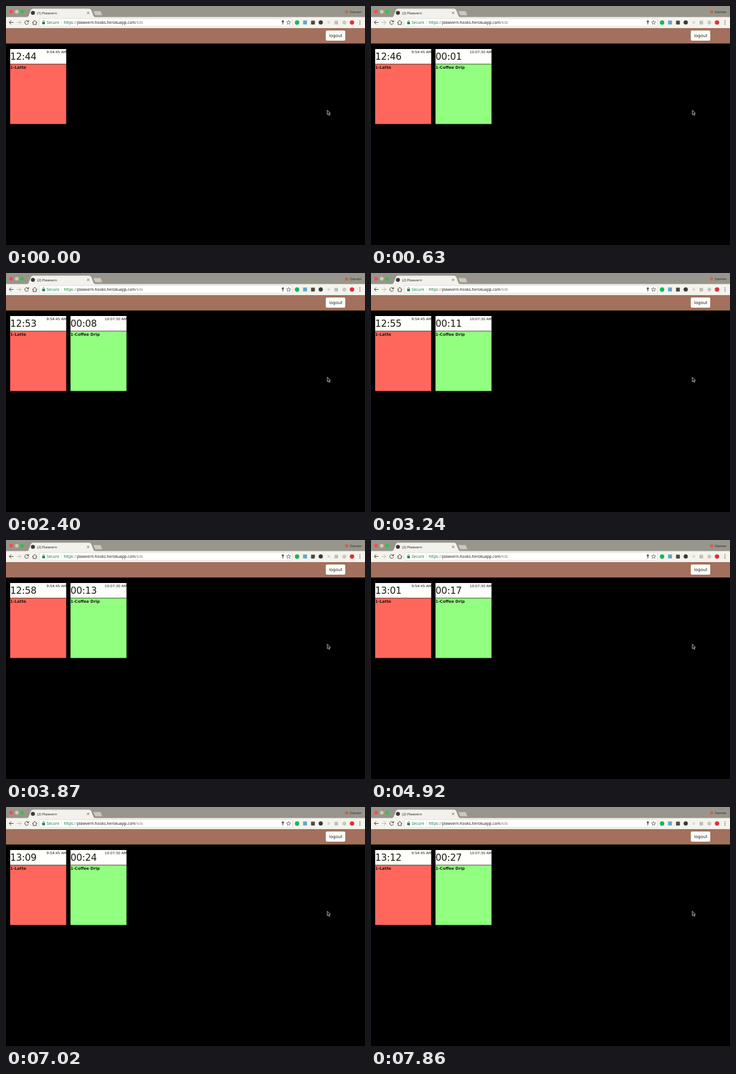
An HTML page that plays this animation: 600 by 400 pixels, repeating every 8000 ms.

```html
<!DOCTYPE html>
<html lang="en">
<head>
<meta charset="utf-8">
<title>Order board</title>
<style>
  html, body { margin: 0; width: 100%; height: 100%; overflow: hidden; background: #000; }
  svg { display: block; width: 600px; height: 400px; }
  text { white-space: pre; }
  .ui { font-family: "Noto Sans", "Open Sans", sans-serif; fill: #26251f; }
  .page { font-family: "DejaVu Sans", Verdana, sans-serif; fill: #1b1a10; }
  .timer { font-size: 15.6px; letter-spacing: -.2px; }
  .stamp { font-size: 5.8px; text-anchor: end; }
  .item { font-size: 6.6px; font-weight: bold; }
  .line { fill: none; stroke: #45443e; }
  .pale { stroke: #bbb9b0; }
  .secure { fill: #188038; }
  .faint { fill: #888680; }
</style>
</head>
<body>
<svg viewBox="0 0 600 400">
  <rect width="600" height="400"/>

  <!-- tab strip -->
  <rect width="600" height="19" fill="#98958c"/>
  <circle cx="8.5" cy="9.5" r="3.1" fill="#fb4b4b"/>
  <circle cx="18" cy="9.5" r="3.1" fill="#d0cab0"/>
  <circle cx="27" cy="9.5" r="3.1" fill="#2fc63c"/>
  <path d="M35 19 Q37 18.500 38 16 L41.500 7 Q42.500 4.500 45 4.500 H139 Q141.500 4.500 142.500 7 L146 16 Q147 18.500 149 19Z" fill="#f2f1ec"/>
  <path d="M146 8.500 H157 Q158 8.500 158.500 9.500 L161 15.500 H150 Q149 15.500 148.500 14.500Z" fill="#cbc8bc"/>
  <circle cx="45" cy="11.500" r="3.300" fill="#3a3936"/>
  <text class="ui" id="tab" x="52" y="13.600" font-size="5.800"></text>
  <path class="line" d="M135.500 9.700 l3.600 3.600 m0 -3.600 l-3.600 3.600" stroke-width=".8"/>
  <circle cx="569.500" cy="9.700" r="2.800" fill="#c0694a"/>
  <text class="ui" x="575" y="11.800" font-size="5.800">Darren</text>

  <!-- toolbar -->
  <rect y="18.500" width="600" height="18.500" fill="#f4f3ec"/>
  <rect x="55.500" y="21" width="423" height="13" rx="1.500" fill="#fff" stroke="#d0cec6" stroke-width=".7"/>
  <path class="line" d="M12.500 27.500 H5.500 m3.200 -3.200 l-3.200 3.200 l3.200 3.200"/>
  <path class="line pale" d="M18 27.500 h7 m-3.200 -3.200 l3.200 3.200 l-3.200 3.200"/>
  <path class="line" d="M37.200 26 A3.100 3.100 0 1 0 37.500 28.500 M37.800 23.800 v2.600 h-2.600"/>
  <path class="line" d="M44 27.800 L48 24 L52 27.800 M45.300 27 v4 h5.400 v-4"/>
  <rect class="secure" x="60.500" y="26.800" width="4.600" height="3.700"/>
  <path d="M61.500 27 v-1.300 a1.300 1.300 0 0 1 2.600 0 V27" fill="none" stroke="#188038" stroke-width=".8"/>
  <text class="ui secure" x="68" y="29.900" font-size="6.600">Secure</text>
  <path d="M92.800 23.500 v8" stroke="#d8d6d0" stroke-width=".6"/>
  <text class="ui" x="96.500" y="29.900" font-size="6.450"><tspan class="secure">https</tspan><tspan class="faint">://</tspan>plawvern-hooks.herokuapp.com<tspan class="faint">/kds</tspan></text>
  <circle cx="462.700" cy="25.800" r="1.900" fill="#5a5852"/>
  <path d="M462.700 27 v4" stroke="#5a5852" stroke-width="1.200"/>
  <path class="line" stroke-width=".7" d="M472.300 24 l1 2.400 2.600 .2 -2 1.700 .6 2.500 -2.200 -1.400 -2.200 1.400 .6 -2.500 -2 -1.700 2.600 -.2Z"/>
  <circle cx="486.500" cy="27.700" r="3.700" fill="#16b860"/>
  <rect x="496.500" y="24.300" width="6.500" height="6.500" fill="#63a5cf"/>
  <rect x="509.800" y="24.500" width="6.400" height="6.400" rx="1" fill="#4b4a46"/>
  <circle cx="526" cy="27.600" r="3.500" fill="#3a3936"/>
  <rect x="537.500" y="25.500" width="4" height="4" fill="#d9d7d0"/>
  <rect x="549" y="24.800" width="6" height="6" fill="#c1bfb8"/>
  <circle cx="565.500" cy="27.700" r="3.200" fill="#cac8c0"/>
  <circle cx="578.300" cy="27.600" r="3.700" fill="#e62d3a"/>
  <g fill="#55534e">
    <circle cx="591.500" cy="24.800" r=".8"/>
    <circle cx="591.500" cy="27.600" r=".8"/>
    <circle cx="591.500" cy="30.400" r=".8"/>
  </g>

  <!-- page header -->
  <rect y="37" width="600" height="25.500" fill="#a3705d"/>
  <path d="M0 62.500 H600" stroke="#6b5b2c"/>
  <rect x="534.500" y="41" width="32.500" height="17" rx="2" fill="#fffffc"/>
  <text class="page" x="540" y="52.200" font-size="7">logout</text>

  <g id="cards"></g>
  <path d="M537 174.300 v7.600 l1.700 -1.500 1.300 2.700 1.300 -.6 -1.200 -2.600 h2.200Z" fill="#111" stroke="#d9d7cc" stroke-width=".8"/>
</svg>
<script>
const LOOP = 8000;
const SECOND = 285;      // one counted second, sped up
const DRIP_TICK = 72;    // the new order arrives and starts its own timer
const LATTE_TICK = 118;  // first tick of the older timer
const LATTE_AGE = 12 * 60 + 44;

const tab = document.getElementById("tab");
const cards = document.getElementById("cards");

function addCard(x, stamp, item, color) {
  const g = document.createElementNS("http://www.w3.org/2000/svg", "g");
  g.setAttribute("transform", `translate(${x} 72)`);
  g.innerHTML = `
    <rect width="93.6" height="25" fill="#fffffc"/>
    <rect y="25" width="93.6" height="100.5" fill="${color}"/>
    <path d="M0 25.200 H93.600" stroke="#29281a" stroke-width=".8"/>
    <text class="page timer" x="0" y="18.300"></text>
    <text class="page stamp" x="94" y="6.800">${stamp}</text>
    <text class="page item" x="0" y="32.700">${item}</text>`;
  cards.append(g);
  return { g, timer: g.querySelector(".timer") };
}

const latte = addCard(7, "9:54:45 AM", "1-Latte", "#ff675c");
const drip = addCard(107.8, "10:07:30 AM", "1-Coffee Drip", "#92ff80");

const pad = n => String(n).padStart(2, "0");
const clock = s => pad(Math.floor(s / 60)) + ":" + pad(s % 60);
const ticks = (t, first) => Math.floor((t - first) / SECOND) + 1;
const setText = (el, s) => { if (el.textContent !== s) el.textContent = s; };

function draw(now) {
  const t = now % LOOP;
  const arrived = t >= DRIP_TICK;
  setText(latte.timer, clock(LATTE_AGE + ticks(t, LATTE_TICK)));
  setText(drip.timer, clock(Math.max(0, ticks(t, DRIP_TICK) - 1)));
  drip.g.setAttribute("visibility", arrived ? "visible" : "hidden");
  setText(tab, `(${arrived ? 2 : 1}) Plawvern`);
}

const begin = performance.now();
function loop() {
  draw(performance.now() - begin);
  requestAnimationFrame(loop);
}
loop();
</script>
</body>
</html>
```
